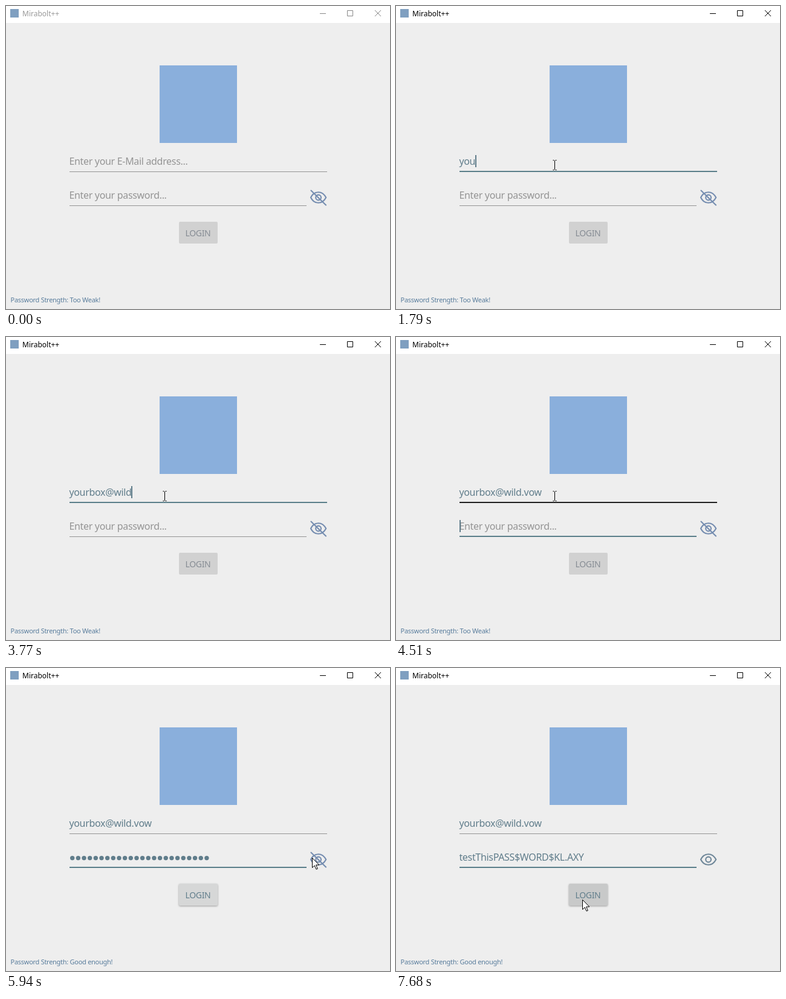
Write an HTML page that moves like this. It is 635 px wide and 500 px high and loops after 8 s.

```html
<!DOCTYPE html>
<html lang="en">
<head>
<meta charset="utf-8">
<title>Login window</title>
<style>
  html, body { margin: 0; width: 100%; height: 100%; overflow: hidden; background: #eee; }
  svg { display: block; }
  text { font: 16px "Noto Sans", "Open Sans", sans-serif; letter-spacing: -.02em; fill: #607d8b; }
  #title { font-size: 12px; letter-spacing: 0; }
  #status { font-size: 11px; letter-spacing: -.025em; fill: #587c9c; }
  #label { font-size: 14px; letter-spacing: -.025em; }
  .line { fill: none; stroke-width: 1; }
  .caret { fill: #607d8b; }
  #eye { fill: none; stroke-width: 2.1; stroke-linecap: round; }
  #dots { stroke: #607d8b; stroke-width: 7.4; stroke-linecap: round; stroke-dasharray: 0 9.66; }
</style>
</head>
<body>
<svg width="635" height="500" viewBox="0 0 635 500">
  <rect width="635" height="500" fill="#eee"/>
  <rect width="635" height="28" fill="#fff"/>
  <rect x="7" y="5" width="14" height="14" fill="#7f9fc0"/>
  <text id="title" x="27" y="17">Mirabolt++</text>
  <path id="controls" class="line" d="M519 12.5h10M564.5 7.5h9v9h-9zM610 7l10 10M620 7l-10 10"/>

  <rect x="254" y="98" width="128" height="128" fill="#8aafdc"/>

  <text id="mail" x="104.4" y="262"></text>
  <rect id="mailLine" x="105" width="426"/>
  <rect id="mailCaret" class="caret" y="246" width="2" height="20"/>

  <text id="pass" x="104.4" y="318"></text>
  <path id="dots" d="M109.7 313.6H332.2"/>
  <rect id="passLine" x="105" width="392"/>
  <rect id="passCaret" class="caret" y="302" width="2" height="20"/>

  <g id="eye">
    <path d="M504 316C507 310 511 307.2 516.6 307.2S526 310 529.2 316C526 322 522 324.8 516.6 324.8S507 322 504 316Z"/>
    <circle cx="516.6" cy="316" r="4.4"/>
    <path id="slash" d="M504.5 304.5L529 328.5"/>
  </g>

  <rect id="button" x="286" y="356" width="64" height="36" rx="2"/>
  <text id="label" x="296.5" y="380">LOGIN</text>
  <text id="status" x="7.5" y="489"></text>

  <circle id="ring" r="11.5" fill="none" stroke="#222"/>
  <path id="arrow" d="M.5 .5v16l3.7-3.5 2.8 6.2 2.3-1-2.7-6.2h5.2z" fill="#fff" stroke="#000"/>
  <path id="beam" class="line" stroke="#000" d="M-2.5-7.5h2M1.5-7.5h2M.5-7v15M-2.5 8.5h2M1.5 8.5h2"/>
</svg>
<script>
const LOOP = 8000, BLINK = 530;
const ADDRESS = 'yourbox@wild.vow', SECRET = 'testThisPASS$WORD$KL.AXY';
const KEYS = [1390, 1660, 1790, 1920, 2050, 2250, 2320, 2920, 3180, 3280, 3370, 3770, 3970, 4110, 4210, 4310];
const FOCUS = 980, TAB = 4510, PASTE = 5060, REVEAL = 6270;

// Pointer moves: start, end, steps, from, to
const MOVES = [
  [180, 850, 10, [330, 466], [262, 262]],
  [5390, 5940, 8, [262, 262], [506, 313]],
  [6530, 7280, 11, [506, 313], [322, 376]],
  [7350, 7480, 2, [322, 376], [308, 382]]
];
const PRESSES = [[FOCUS, 1110], [6140, REVEAL]];

const $ = id => document.getElementById(id);
const set = (id, attrs) => { for (const k in attrs) $(id).setAttribute(k, attrs[k]); };
const show = (id, on) => set(id, { visibility: on ? 'visible' : 'hidden' });
const inside = ([x, y], l, t, r, b) => x >= l && x < r && y >= t && y < b;
const blinkOn = (t, since) => Math.floor((t - since) / BLINK) % 2 === 0;

function pointer(t) {
  const [start, end, steps, from, to] = MOVES.findLast(m => t >= m[0]) || MOVES[0];
  const p = Math.min(1, Math.max(0, Math.floor((t - start) / (end - start) * steps + 1e-6) / steps));
  const e = p * p * (3 - 2 * p);
  return from.map((a, i) => Math.round(a + (to[i] - a) * e));
}

function write(id, value, hint) {
  $(id).textContent = value || hint;
  $(id).style.fill = value ? '#607d8b' : '#949494';
}

function underline(id, y, focused, hovered) {
  const thick = focused || hovered;
  set(id, {
    y: thick ? y - 1 : y,
    height: thick ? 2 : 1,
    fill: focused ? '#5b7f8a' : hovered ? '#212121' : '#949494'
  });
}

function draw(t) {
  const pos = pointer(t), here = t >= MOVES[0][0];
  const overMail = here && inside(pos, 105, 242, 531, 276);
  const overPass = here && inside(pos, 105, 296, 497, 332);
  const overButton = inside(pos, 286, 356, 350, 392);
  const active = t >= FOCUS, onPass = t >= TAB, onMail = active && !onPass;
  const filled = t >= PASTE, open = t >= REVEAL;

  $('title').style.fill = active ? '#000' : '#999';
  set('controls', { stroke: active ? '#000' : '#888' });

  const typed = KEYS.filter(k => k <= t).length;
  write('mail', ADDRESS.slice(0, typed), 'Enter your E-Mail address...');
  underline('mailLine', 273, onMail, overMail);
  show('mailCaret', onMail && blinkOn(t, KEYS[typed - 1] || FOCUS));
  set('mailCaret', { x: typed ? Math.round(104 + $('mail').getComputedTextLength()) : 105 });

  write('pass', filled ? SECRET : '', 'Enter your password...');
  show('pass', !filled || open);
  show('dots', filled && !open);
  underline('passLine', 329, onPass, overPass);
  show('passCaret', onPass && blinkOn(t, filled ? 5030 : TAB));
  set('passCaret', { x: open ? Math.round(104 + $('pass').getComputedTextLength()) : filled ? 336 : 105 });

  show('slash', !open);
  set('eye', { stroke: open ? '#6f8799' : '#758db0' });

  set('button', { fill: !filled ? '#d1d1d1' : overButton ? '#c8c9c9' : '#d6d7d7' });
  $('button').style.filter = filled ? 'drop-shadow(0 1px 1.5px rgba(0,0,0,.35))' : '';
  $('label').style.fill = filled ? '#607d8b' : '#858b93';
  $('status').textContent = 'Password Strength: ' + (filled ? 'Good enough!' : 'Too Weak!');

  const beam = overMail || overPass;
  show('arrow', here && !beam);
  show('beam', beam);
  show('ring', PRESSES.some(([a, b]) => t >= a && t < b));
  set('ring', { cx: pos[0] - 2, cy: pos[1] - 1 });
  for (const id of ['arrow', 'beam']) set(id, { transform: `translate(${pos})` });
}

function tick() {
  draw(performance.now() % LOOP);
  requestAnimationFrame(tick);
}
tick();
</script>
</body>
</html>
```
